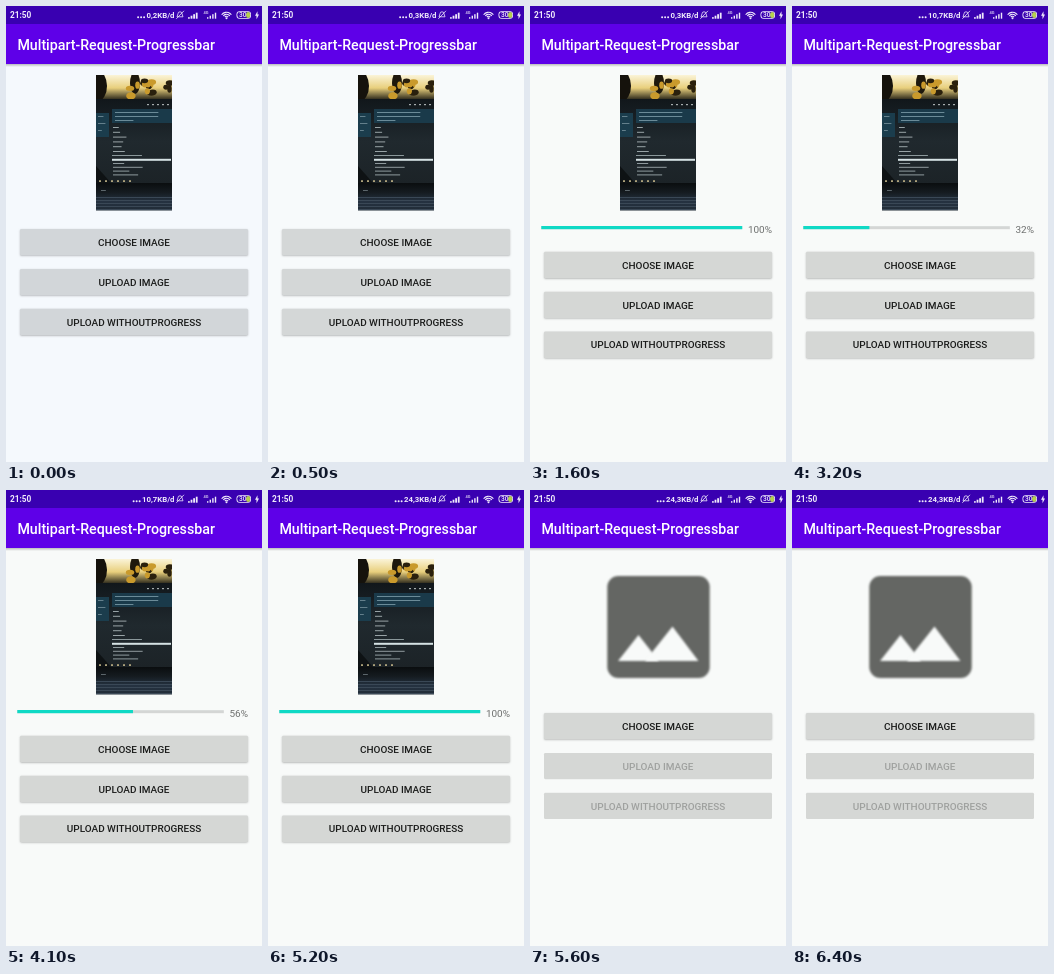
An HTML page with a canvas that plays this animation: 256 by 456 pixels, repeating every 6600 ms.

```html
<!DOCTYPE html>
<html lang="en">
<head>
<meta charset="utf-8">
<title>Upload progress</title>
<style>
html, body { margin: 0; width: 100%; height: 100%; overflow: hidden; background: #f8faf9; }
canvas { display: block; width: 256px; height: 456px; }
</style>
</head>
<body>
<canvas id="stage"></canvas>
<script>
const LOOP = 6600, W = 256, H = 456;
const BAR_SHOWN = 1000, UPLOAD = 2900, CLEARED = 5300, PLACEHOLDER = 5400;
const LIGHT = '#efe9fb', PURPLE = '#3900b1';
const canvas = document.getElementById('stage');
const ctx = canvas.getContext('2d');
const dpr = window.devicePixelRatio || 1;
canvas.width = W * dpr;
canvas.height = H * dpr;
ctx.scale(dpr, dpr);

const clamp = v => Math.min(1, Math.max(0, v));

// The upload advances in four accelerating chunks.
function progressAt(t) {
  if (t < UPLOAD) return 100;
  const chunk = clamp(Math.floor((t - 3000) / 400) / 4);
  return Math.round(32 + 68 * chunk ** 1.5);
}

function speedAt(t) {
  if (t < 500) return '0,2';
  if (t < 2100) return '0,3';
  return t < 4400 ? '10,7' : '24,3';
}

function seeded(seed) {
  return () => (seed = seed * 16807 % 2147483647) / 2147483647;
}

function rect(x, y, w, h, color) {
  ctx.fillStyle = color;
  ctx.fillRect(x, y, w, h);
}

function round(x, y, w, h, r, color) {
  ctx.fillStyle = color;
  ctx.beginPath();
  ctx.roundRect(x, y, w, h, r);
  ctx.fill();
}

function triangle(x1, y1, x2, y2, x3, y3, color) {
  ctx.fillStyle = color;
  ctx.beginPath();
  ctx.moveTo(x1, y1);
  ctx.lineTo(x2, y2);
  ctx.lineTo(x3, y3);
  ctx.fill();
}

function ellipse(x, y, rx, ry, color) {
  ctx.fillStyle = color;
  ctx.beginPath();
  ctx.ellipse(x, y, rx, ry, 0, 0, Math.PI * 2);
  ctx.fill();
}

function text(s, x, y, size, color, weight = 400, align = 'left') {
  ctx.font = `${weight} ${size}px Roboto, sans-serif`;
  ctx.fillStyle = color;
  ctx.textAlign = align;
  ctx.fillText(s, x, y);
}

function gradient(y0, y1, ...colors) {
  const g = ctx.createLinearGradient(0, y0, 0, y1);
  colors.forEach((c, i) => g.addColorStop(i / (colors.length - 1), c));
  return g;
}

function signal(x, barWidth) {
  for (let i = 0; i < 4; i++) {
    const h = 1.5 + i * 1.5;
    rect(x + i * 2.6, 12.7 - h, barWidth, h, LIGHT);
  }
}

function wifi(x, y) {
  ctx.strokeStyle = LIGHT;
  ctx.lineWidth = 1.1;
  for (let r = 2; r <= 6; r += 2) {
    ctx.beginPath();
    ctx.arc(x, y, r, -Math.PI * 0.8, -Math.PI * 0.2);
    ctx.stroke();
  }
  ellipse(x, y, 1, 1, LIGHT);
}

function mutedBell(x, y) {
  ctx.strokeStyle = LIGHT;
  ctx.lineWidth = 0.8;
  ctx.beginPath();
  ctx.arc(x, y - 1, 2, Math.PI, 0);
  ctx.lineTo(x + 3, y + 2);
  ctx.lineTo(x - 3, y + 2);
  ctx.closePath();
  ctx.moveTo(x - 3.7, y + 4);
  ctx.lineTo(x + 4, y - 4);
  ctx.stroke();
}

function battery(x, y) {
  round(x, y, 14.5, 7.6, 3, LIGHT);
  round(x + 0.9, y + 0.9, 12.7, 5.8, 2.2, PURPLE);
  round(x + 9.6, y + 0.9, 4, 5.8, 2, '#b5d04c');
  text('30', x + 6.2, y + 6.2, 6.6, LIGHT, 500, 'center');
  triangle(x + 21, y, x + 18.5, y + 4.6, x + 21, y + 4.6, LIGHT);
  triangle(x + 20, y + 8, x + 20, y + 3.4, x + 22.5, y + 3.4, LIGHT);
}

function statusBar(t) {
  rect(0, 0, W, 18, PURPLE);
  text('21:50', 4, 12.4, 8.3, LIGHT, 700);
  const label = speedAt(t) + 'KB/d';
  text(label, 168.5, 12.3, 7.8, LIGHT, 600, 'right');
  const left = 168.5 - ctx.measureText(label).width;
  for (let i = 1; i <= 3; i++) ellipse(left + 0.7 - i * 3, 11.3, 1, 1, LIGHT);
  mutedBell(174, 8.8);
  signal(182, 1.8);
  signal(201, 1.4);
  text('4G', 197.5, 8.2, 4, LIGHT, 500);
  wifi(220.5, 12.3);
  battery(230.5, 5.2);
}

function appBar() {
  rect(0, 58, W, 3, gradient(58, 61, 'rgba(0,0,0,.25)', 'rgba(0,0,0,0)'));
  rect(0, 18, W, 40, '#5e00e8');
  text('Multipart-Request-Progressbar', 11.4, 43.5, 14.22, '#fff', 500);
}

function textRows(x, y, rows, gap, maxWidth, color, random) {
  for (let i = 0; i < rows; i++) rect(x, y + i * gap, maxWidth * (0.3 + 0.7 * random()), 1, color);
}

function photo() {
  const random = seeded(42);
  ctx.save();
  ctx.beginPath();
  ctx.rect(90, 69, 76, 135.5);
  ctx.clip();

  // Bright room above the laptop
  rect(90, 69, 76, 26, gradient(69, 95, '#fbf4d8', '#e8cf7c', '#14130f'));
  ellipse(92, 80, 9, 15, '#15120c');
  ellipse(129, 77, 5, 11, '#1e180c');
  for (let i = 0; i < 16; i++) {
    const color = i % 2 ? '#2a200d' : '#c99a2c';
    ellipse(124 + 40 * random(), 74 + 16 * random(), 2 + 3 * random(), 2 + 2 * random(), color);
  }

  // Laptop screen
  rect(90, 93, 76, 84, gradient(93, 177, '#11171b', '#20292e', '#1c2327'));
  for (let x = 141; x < 165; x += 5) rect(x, 98, 2, 1.2, '#a5acad');
  rect(90, 107, 13, 24, '#1b3d4d');
  rect(106, 103, 60, 14, '#1a3a4a');
  textRows(92, 110, 3, 7, 9, '#64808c', random);
  textRows(109, 106, 3, 4, 50, '#6b8b98', random);
  textRows(107, 121, 6, 4.8, 18, '#98a3a6', random);
  textRows(106, 149, 1, 1, 45, '#8b989b', random);
  rect(106, 152.8, 59, 2, '#d5e2e4');
  textRows(107, 157, 4, 3.8, 30, '#8f9a9d', random);
  triangle(90, 160, 90, 178, 106, 178, '#0e1214');
  for (let x = 93; x < 126; x += 6) rect(x, 174.3, 2, 1.6, '#bfb285');

  // Hinge and keyboard deck
  rect(90, 177, 76, 28, gradient(177, 205, '#0a0d0f', '#151b20', '#253241', '#202b35'));
  for (let y = 191; y < 205; y += 3) rect(90, y, 76, 1, '#3a4856');
  textRows(95, 184, 1, 1, 10, '#5c666b', random);
  ctx.restore();
}

function placeholder() {
  ctx.save();
  ctx.filter = 'blur(0.8px)';
  round(77.3, 86, 102.4, 102, 11, '#646663');
  triangle(88, 171, 108.5, 145, 129, 171, '#f8faf9');
  triangle(115, 171, 142.5, 136.5, 168.5, 171, '#f8faf9');
  ctx.restore();
}

function button(label, y, enabled, color) {
  ctx.save();
  if (enabled) {
    ctx.shadowColor = 'rgba(0,0,0,.25)';
    ctx.shadowBlur = 2 * dpr;
    ctx.shadowOffsetY = 0.8 * dpr;
  }
  round(14, y, 228, 26.3, 1.4, color);
  ctx.restore();
  text(label, 128, y + 16.8, 9.96, enabled ? '#1b1c1b' : '#9fa19f', 500, 'center');
}

function progressBar(value) {
  const label = value + '%';
  text(label, 242, 226.6, 9.96, '#6c6e6d', 400, 'right');
  const width = 242 - ctx.measureText(label).width - 5.7 - 11.3;
  rect(11.3, 220.2, width, 3, '#d4d6d5');
  rect(11.3, 220, width * value / 100, 3.2, '#10d9c5');
}

function draw(t) {
  // The picture starts slightly cool and settles to neutral.
  const cool = 1 - clamp((t - 100) / 700);
  const tint = (r, g, b) => `rgb(${r - 3 * cool},${g - cool},${b + 4 * cool})`;
  rect(0, 0, W, H, tint(248, 250, 249));

  const uploading = t >= BAR_SHOWN && t < CLEARED;
  const hasPhoto = t < CLEARED;
  if (hasPhoto) photo();
  else if (t >= PLACEHOLDER) placeholder();
  if (uploading) progressBar(progressAt(t));

  const labels = ['CHOOSE IMAGE', 'UPLOAD IMAGE', 'UPLOAD WITHOUTPROGRESS'];
  const top = uploading ? 245.8 : 223;
  labels.forEach((label, i) => button(label, top + i * 39.9, hasPhoto || i === 0, tint(213, 215, 213)));
  appBar();
  statusBar(t);
}

const start = performance.now();
function frame() {
  draw((performance.now() - start) % LOOP);
  requestAnimationFrame(frame);
}
frame();
</script>
</body>
</html>
```
